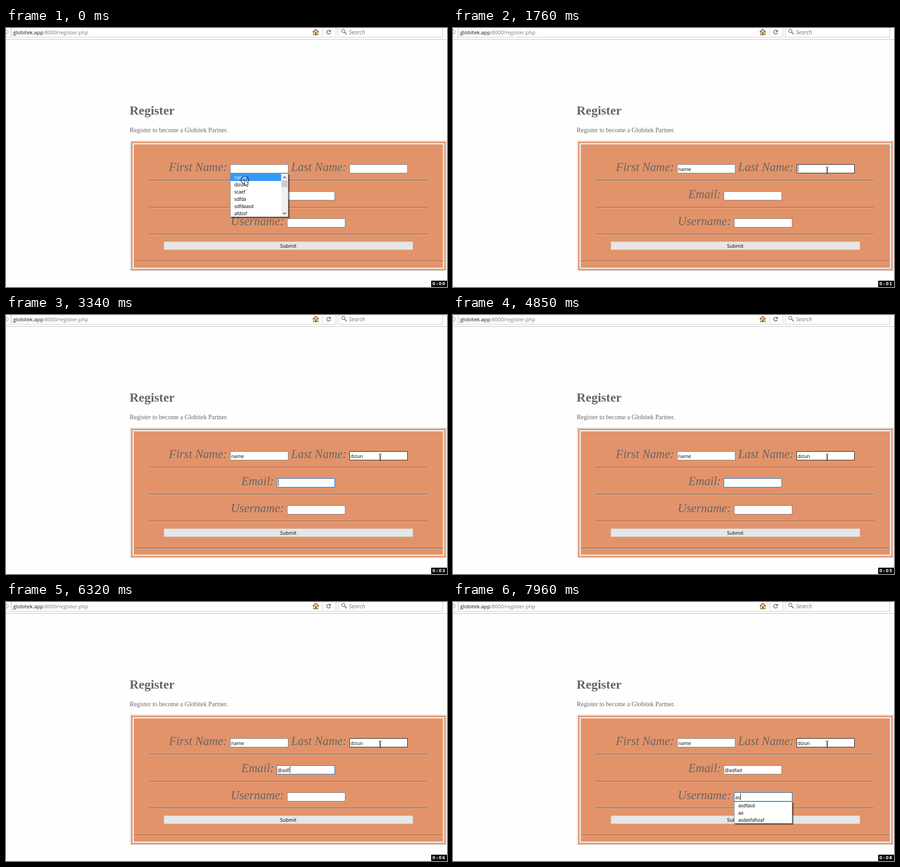
These frames come from a looping animation (976 px wide and 574 px high, 8000 ms). An HTML page:

```html
<!DOCTYPE html>
<html lang="en">
<head>
<meta charset="utf-8">
<title>Register</title>
<style>
html, body { margin: 0; width: 100%; height: 100%; overflow: hidden; background: #fefefe; }
svg { display: block; }
text { white-space: pre; }
.ui { font-family: "Open Sans", "Noto Sans", sans-serif; }
.serif { font-family: "Liberation Serif", "Noto Serif", serif; fill: #666; }
.label { font-size: 26.5px; font-style: italic; }
.value { font-size: 10.6px; }
.item { font-size: 10.5px; letter-spacing: -.25px; }
.clock { font: bold 9px "DejaVu Sans", sans-serif; fill: #fff; }
.line { fill: none; stroke: #c8c8c8; }
</style>
</head>
<body>
<svg width="976" height="574" viewBox="0 0 976 574">
  <rect width="976" height="574" fill="#fefefe"/>

  <!-- toolbar -->
  <g>
    <path class="line" d="M0 20.5H730.5V0M700.5 1V18M735.5 0V20.5H966.5V0"/>
    <path d="M11.5 0V19" stroke="#aaa"/>
    <path d="M0 25.5H976" stroke="#bdbdbd"/>
    <circle cx="0" cy="9" r="5" fill="none" stroke="#888"/>
    <path d="M.5 6V7M.5 8.500V12" stroke="#888"/>
    <text class="ui" x="16" y="14" font-size="11.6" fill="#111">globitek.app<tspan fill="#777">:8000/register.php</tspan></text>
    <path d="M680.500 8.500H690.500V15H680.500Z" fill="#f1dfb4" stroke="#8a6a3c"/>
    <path d="M679 9L685.500 3L692 9" fill="none" stroke="#a4552f" stroke-width="2"/>
    <path d="M684 10H687.500V15H684Z" fill="#8a5a30"/>
    <path d="M679 15.500H692" stroke="#6f9b45"/>
    <path d="M717.200 6.500A4.200 4.200 0 1 0 718 10.500" fill="none" stroke="#666" stroke-width="1.600"/>
    <path d="M719 3.500V8.500H714Z" fill="#666"/>
    <circle cx="746.500" cy="6.500" r="3.600" fill="none" stroke="#777" stroke-width="1.500"/>
    <path d="M749.300 9.300L754 14" stroke="#777" stroke-width="2"/>
    <text class="ui" x="759" y="14" font-size="12" font-style="italic" fill="#777">Search</text>
  </g>

  <text class="serif" x="273.500" y="192" font-size="28" font-weight="bold">Register</text>
  <text class="serif" x="274" y="231" font-size="14">Register to become a Globitek Partner.</text>

  <!-- form with its double border -->
  <g shape-rendering="crispEdges">
    <path d="M274 249H976V539H274Z" fill="#e8e6e5"/>
    <path d="M277 252H973V537H277Z" fill="#e2936a"/>
    <path d="M280 255H970V534H280Z" fill="#f1eae6"/>
    <path d="M283 258H967V531H283Z" fill="#e2936a"/>
    <g id="rules"></g>
    <rect x="349" y="473" width="552" height="19" fill="#e6e6e6"/>
    <rect x="349.500" y="473.500" width="551" height="18" fill="none" stroke="#c9bfb8"/>
  </g>
  <text class="ui" x="606.500" y="487" font-size="11">Submit</text>
  <text class="serif label" x="360.500" y="317">First Name:</text>
  <text class="serif label" x="631" y="317">Last Name:</text>
  <text class="serif label" x="521" y="377">Email:</text>
  <text class="serif label" x="497.500" y="437">Username:</text>
  <g id="fields"></g>
  <rect id="caret" width="1" height="15" shape-rendering="crispEdges"/>
  <g id="list"></g>

  <g id="pointer">
    <circle id="ring" cx=".5" cy="1" r="8.500" fill="none" stroke="#222" stroke-width="1.200"/>
    <path id="arrow" d="M0 0V13.500L3 10.800L5.200 15.600L7.400 14.600L5.300 10H9.500Z" fill="#fff" stroke="#000" stroke-width=".9"/>
    <g id="beam" fill="none">
      <path d="M-3 -8H3M0 -8V9M-3 9H3" stroke="#fff" stroke-width="3" opacity=".8"/>
      <path d="M-3 -8H-1M1 -8H3M-3 9H-1M1 9H3" stroke="#000"/>
      <path d="M0 -7.500V8.500" stroke="#000" stroke-width="1.600"/>
    </g>
  </g>

  <rect x="941" y="560" width="35" height="14"/>
  <text class="clock" id="clock" x="943.800 952.200 957.800 965.600" y="570"></text>
</svg>
<script>
const LOOP = 8000;
const $ = id => document.getElementById(id);
const show = (el, on) => el.setAttribute("display", on ? "inline" : "none");

$("rules").innerHTML = [[317, 337, 615], [317, 397, 615], [317, 456, 615], [283, 516, 684]].map(([x, y, w]) =>
  `<rect x="${x}" y="${y}" width="${w}" height="1" fill="#70503f"/>
   <rect x="${x}" y="${y + 1}" width="${w}" height="1" fill="#efc4ac"/>`).join("");

const fields = { first: [496, 302], last: [760, 302], email: [599, 362], user: [622, 422] };
const names = Object.keys(fields);
const boxes = {}, values = {};
$("fields").innerHTML = names.map(n => {
  const [x, y] = fields[n];
  return `<rect id="${n}Box" x="${x + .5}" y="${y + .5}" width="128" height="19" fill="#fff"/>
    <text id="${n}Text" class="ui value" x="${x + 2.5}" y="${y + 14.8}"></text>`;
}).join("");
for (const n of names) { boxes[n] = $(n + "Box"); values[n] = $(n + "Text"); }

const lists = {
  first: ["name", "dizun", "scaef", "sdfda", "sdfdaasd", "afdssf"],
  last: ["Dolmeza", "Dolmezapku", "bc bv"],
  email: ["@", "@#", "@asd", "@sad", "@sadass"],
  emailShort: ["@asd"],
  user: ["asdfasd", "aa", "asdasfafssaf"]
};

function listMarkup(key) {
  if (!key) return "";
  const items = lists[key], long = key === "first";
  const [x, fieldY] = fields[key.replace("Short", "")];
  const y = fieldY + 20, h = items.length * 16 + 1;
  let out = `<rect x="${x + 3}" y="${y + 3}" width="129" height="${h}" fill="#000" opacity=".25"/>
    <rect x="${x + 2}" y="${y + 2}" width="129" height="${h}" fill="#000" opacity=".35"/>
    <rect x="${x + .5}" y="${y + .5}" width="128" height="${h - 1}" fill="#fff" stroke="#8c8c8c"/>`;
  if (long) out += `<rect x="${x + 1}" y="${y + 1}" width="112" height="16" fill="#39f"/>
    <rect x="${x + 113}" y="${y + 1}" width="15" height="${h - 2}" fill="#f0f0f0"/>
    <rect x="${x + 114}" y="${y + 16}" width="13" height="15" fill="#cdcdcd"/>
    <path d="M${x + 117} ${y + 11}l3.500 -3.500l3.500 3.500M${x + 117} ${y + h - 10}l3.500 3.500l3.500 -3.500" fill="none" stroke="#444" stroke-width="1.500"/>`;
  items.forEach((s, i) => {
    out += `<text class="ui item" x="${x + 9.2}" y="${y + 13 + i * 15.9}" fill="${long && !i ? "#fff" : "#000"}">${s}</text>`;
  });
  return out;
}

// Each step changes part of the state and holds until the next one.
const steps = [
  [0, { first: "", last: "", email: "", user: "", focus: "", caret: false, list: "first", at: [528, 336], beam: false, ring: true, hover: "" }],
  [150, { first: "name", list: "", ring: false }],
  [280, { at: [576, 334] }],
  [410, { at: [672, 327] }],
  [540, { at: [781, 318], beam: true, hover: "last" }],
  [690, { at: [842, 316] }],
  [820, { focus: "last", caret: true, ring: true }],
  [950, { ring: false }],
  [1080, { at: [838, 316] }],
  [1190, { at: [833, 316] }],
  [1330, { at: [828, 316], caret: false }],
  [1760, { caret: true }],
  [1900, {}],
  [2040, { last: "d", list: "last" }],
  [2180, { last: "di" }],
  [2340, { last: "diz", list: "" }],
  [2480, { last: "dizu" }],
  [2790, { last: "dizun" }],
  [2950, {}],
  [3340, { focus: "email" }],
  [3740, { caret: false }],
  [3940, {}],
  [4140, { caret: true }],
  [4550, { caret: false }],
  [4850, {}],
  [4970, { caret: true }],
  [5370, { caret: false }],
  [5650, { email: "@", list: "email", caret: true }],
  [5910, { email: "@a", list: "emailShort" }],
  [6050, { email: "@ad", list: "" }],
  [6190, { email: "@adf" }],
  [6330, { email: "@adfa" }],
  [6470, { email: "@adfad" }],
  [6750, { caret: false }],
  [6880, { caret: true }],
  [7030, { focus: "user" }],
  [7320, { caret: false }],
  [7740, { caret: true }],
  [7850, { user: "a", list: "user" }],
  [7960, { user: "as" }]
];
let state = {};
const states = steps.map(([time, change]) => state = { ...state, ...change, time });

function draw(s) {
  for (const n of names) {
    values[n].textContent = s[n];
    boxes[n].setAttribute("stroke", s.hover === n ? "#111" : s.focus === n ? "#0078d7" : "#7b7b7b");
  }
  show($("caret"), s.caret && s.focus);
  if (s.focus) {
    const [x, y] = fields[s.focus];
    const w = s[s.focus] ? values[s.focus].getComputedTextLength() : 0;
    $("caret").setAttribute("x", x + 3 + Math.round(w));
    $("caret").setAttribute("y", y + 2);
  }
  $("list").innerHTML = listMarkup(s.list);
  $("pointer").setAttribute("transform", `translate(${s.at})`);
  show($("ring"), s.ring);
  show($("arrow"), !s.beam);
  show($("beam"), s.beam);
  $("clock").textContent = "0:0" + Math.floor((s.time + 200) / 1000);
}

const start = performance.now();
let current;
function tick() {
  const t = (performance.now() - start) % LOOP;
  const next = states.findLast(s => s.time <= t);
  if (next !== current) draw(current = next);
  requestAnimationFrame(tick);
}
tick();
</script>
</body>
</html>
```
